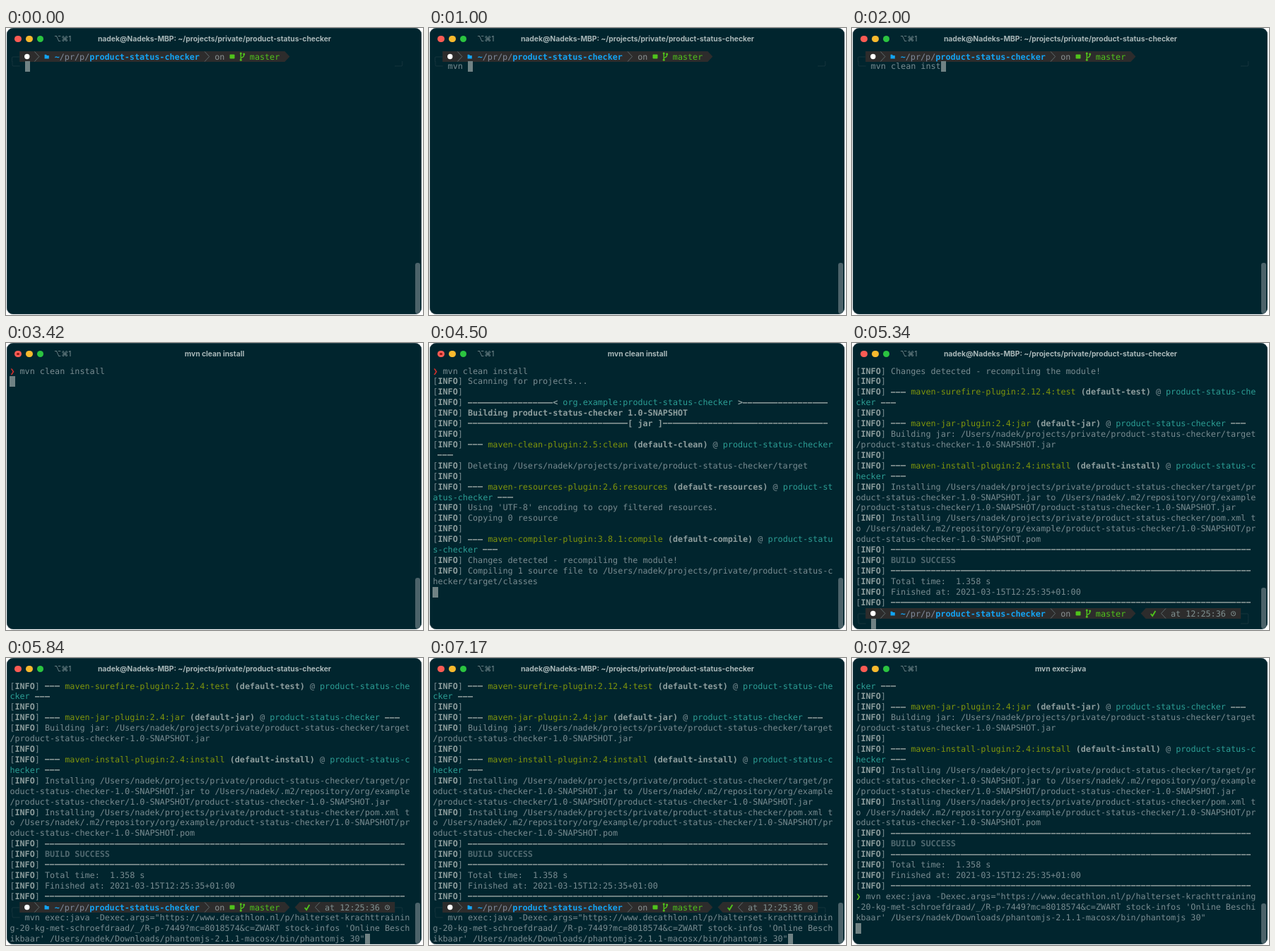
Animation, 590 px wide and 407 px high, one loop 8000 ms. Source, as an HTML page:

```html
<!DOCTYPE html>
<html lang="en">
<head>
<meta charset="utf-8">
<title>Terminal session</title>
<style>
  html, body { margin: 0; width: 100%; height: 100%; overflow: hidden; background: #fff; }
  #window {
    position: absolute; left: 1px; top: 0; width: 587px; height: 406px;
    border-radius: 9px; background: #01252e; overflow: hidden;
    box-shadow: inset 0 0 0 .6px #4a6067;
  }
  #stage { position: absolute; left: -1px; top: 0; width: 590px; height: 407px; }
  .light { position: absolute; top: 10.7px; width: 9.6px; height: 9.6px; border-radius: 50%; }
  #busy { position: absolute; left: 15.3px; top: 13.8px; width: 3.4px; height: 3.4px; border-radius: 50%; background: #8c1a14; }
  #title, #tab {
    position: absolute; top: 8px; white-space: pre;
    font: 700 10.3px/15px Inter, "DejaVu Sans", sans-serif;
  }
  #title { left: 0; width: 590px; text-align: center; color: #a9b7b8; }
  #tab { left: 68px; font-weight: 400; font-size: 10px; color: #7d9094; }
  #screen, #screen text {
    font: 11.76px/14.93px "DejaVu Sans Mono", monospace;
    text-rendering: geometricPrecision; font-variant-ligatures: none;
  }
  #screen { position: absolute; left: 5.4px; top: 32.5px; color: #788b90; }
  .row { position: relative; height: 14.93px; white-space: pre; }
  .row svg { position: absolute; left: 0; top: 0; overflow: visible; }
  .b { font-weight: 700; color: #8d9d9d; }
  .d { font-weight: 700; color: #506970; }
  .g { color: #7f950c; }
  .c { color: #2c9d94; }
  .r { color: #d9302c; }
  .k { color: #5fc41a; }
  .f { color: #17353d; }
  .h {
    color: transparent;
    background: repeating-linear-gradient(90deg, #819090 0 6.4px, #3a5056 6.4px 7.08px) 0 6.3px / 100% 1.7px no-repeat;
  }
  #cursor { position: absolute; width: 7.4px; height: 14.93px; background: #708284; }
  #thumb { position: absolute; left: 579px; width: 6.6px; border-radius: 3.3px; background: #4c636a; }
</style>
</head>
<body>
<div id="window"><div id="stage">
  <i class="light" style="left:12.2px;background:#fc5b54"></i>
  <i class="light" style="left:28.1px;background:#f9b92e"></i>
  <i class="light" style="left:43.8px;background:#2bc440"></i>
  <i id="busy"></i>
  <div id="tab">⌥⌘1</div>
  <div id="title"></div>
  <div id="screen"></div>
  <div id="cursor"></div>
  <div id="thumb"></div>
</div></div>
<script>
const LOOP = 8000, COLS = 80, ROWS = 25, CELL = 7.08, LINE = 14.93, LEFT = 5.4, TOP = 32.5;
const SCROLLBACK = 105, TRACK_TOP = 31, TRACK = 374;
const $ = id => document.getElementById(id);

// Markup: |x:text| gives text the class x.
const toCells = source => source.split("|").flatMap(part => {
  const styled = /^[bdgcrkfh]:/.test(part);
  return [...(styled ? part.slice(2) : part)].map(ch => ({ ch, cls: styled ? part[0] : "" }));
});

function wrap(source) {
  const cells = toCells(source), rows = [];
  do rows.push(cells.splice(0, COLS)); while (cells.length);
  return rows;
}

const project = "product-status-checker";
const home = "/Users/nadek";
const root = `${home}/projects/private/${project}`;
const repo = `${home}/.m2/repository/org/example/${project}/1.0-SNAPSHOT/${project}-1.0-SNAPSHOT`;
const shellTitle = `nadek@Nadeks-MBP: ~/projects/private/${project}`;
const build = "mvn clean install";
const exec = `mvn exec:java -Dexec.args="https://www.decathlon.nl/p/halterset-krachttraining-20-kg-met-schroefdraad/_/R-p-7449?mc=8018574&c=ZWART stock-infos 'Online Beschikbaar' ${home}/Downloads/phantomjs-2.1.1-macosx/bin/phantomjs 30"`;

const info = (text = "") => `[|b:INFO|] ${text}`;
const dashes = n => `|h:${"-".repeat(n)}|`;
const plugin = (goal, id) =>
  info(`${dashes(3)} |g:${goal}| |b:(${id})| @ |c:${project}| ${dashes(3)}`);
const encoding = info("Using 'UTF-8' encoding to copy filtered resources.");
const changes = info("Changes detected - recompiling the module!");
const rule = info(dashes(72));

const log = [
  [3500, info("Scanning for projects...")],
  [3660, info(), info(`${dashes(17)}|b:< ||c:org.example:${project}||b: >|${dashes(17)}`),
    info(`|b:Building ${project} 1.0-SNAPSHOT|`), info(`${dashes(32)}|b:[ jar ]|${dashes(33)}`)],
  [3910, info(), plugin("maven-clean-plugin:2.5:clean", "default-clean"), info(`Deleting ${root}/target`)],
  [4080, info(), plugin("maven-resources-plugin:2.6:resources", "default-resources")],
  [4160, encoding, info("Copying 0 resource")],
  [4250, info(), plugin("maven-compiler-plugin:3.8.1:compile", "default-compile")],
  [4330, changes, info(`Compiling 1 source file to ${root}/target/classes`)],
  [4660, info(), plugin("maven-resources-plugin:2.6:testResources", "default-testResources"), encoding,
    info(`skip non existing resourceDirectory ${root}/src/test/resources`),
    info(), plugin("maven-compiler-plugin:3.8.1:testCompile", "default-testCompile"), changes,
    info(), plugin("maven-surefire-plugin:2.12.4:test", "default-test")],
  [4740, info(), plugin("maven-jar-plugin:2.4:jar", "default-jar"),
    info(`Building jar: ${root}/target/${project}-1.0-SNAPSHOT.jar`)],
  [4820, info(), plugin("maven-install-plugin:2.4:install", "default-install"),
    info(`Installing ${root}/target/${project}-1.0-SNAPSHOT.jar to ${repo}.jar`),
    info(`Installing ${root}/pom.xml to ${repo}.pom`),
    rule, info("|d:BUILD SUCCESS|"), rule,
    info("Total time:  1.358 s"), info("Finished at: 2021-03-15T12:25:35+01:00"), rule],
];

// Prompt header, drawn on the character grid.
const x = col => col * CELL;
const label = (col, text, fill, bold) =>
  `<text x="${x(col)}" y="11.53" fill="${fill}"${bold ? ' style="font-weight:700"' : ""}>${text}</text>`;
const stroke = (d, color, width = 1) =>
  `<path d="${d}" fill="none" stroke="${color}" stroke-width="${width}"/>`;
const green = "#4fc31c", blue = "#12a4f4", bar = "#2d2c2c", thin = "#5f6c6f";

function header(clock) {
  const left = `<path d="M${x(2)} 0H${x(55)}l7 7.5l-7 7.4H${x(2)}z" fill="${bar}"/>
    <circle cx="${x(3.5)}" cy="7.5" r="3.7" fill="#fff"/>
    ${stroke(`M${x(5)} .5l6.5 7l-6.5 7M${x(39)} .5l6.5 7l-6.5 7`, thin)}
    <path d="M${x(7)} 4.8h2.4l1 1.2h2.8v4.4h-6.2z" fill="${blue}"/>
    ${label(9, "~", blue, true)}${label(10, "/pr/p/", "#7f8b9c")}${label(16, project, blue, true)}
    ${label(41, "on", "#8a9293")}
    <rect x="${x(44)}" y="4.4" width="7" height="6.2" rx="1" fill="${green}"/>
    ${stroke(`M${x(46) + 1.6} 3v9.5M${x(46) + 6} 4v1.5q0 2.5 -4.4 4`, green, 1.4)}
    <g fill="${green}"><circle cx="${x(46) + 1.6}" cy="3" r="1.5"/><circle cx="${x(46) + 6}" cy="4" r="1.5"/><circle cx="${x(46) + 1.6}" cy="12.3" r="1.5"/></g>
    ${label(48, "master", green)}${label(0, "╭─", "#17353d")}`;
  const right = clock ? `<path d="M${x(77)} 0H${x(58)}l-7 7.5l7 7.4H${x(77)}z" fill="${bar}"/>
    ${stroke(`M${x(59)} 8l2.4 3l4.2 -7`, green, 1.9)}
    ${stroke(`M${x(62)} .5l-6.5 7l6.5 7`, thin)}
    ${label(63, `at ${clock}`, "#7f9090")}
    <circle cx="${x(75.5)}" cy="7.8" r="3.1" fill="none" stroke="#7f9090"/>
    ${stroke(`M${x(75.5)} 6v2h1.6`, "#7f9090", .8)}${label(77, "─╮", "#17353d")}` : "";
  return `<svg width="580" height="14.93">${left}${right}</svg>`;
}

// Every visible state of the session, in order of time; the view never scrolls back.
const states = [];
let scroll = 0;
function add(at, title, rows, extra = {}) {
  scroll = Math.max(scroll, rows.length - ROWS);
  states.push({ at, title, rows, scroll, ...extra });
}

function prompt(command, clock) {
  const rows = wrap(`|f:╰─| ${command}`);
  const col = rows.at(-1).length;
  if (rows.length === 1) rows[0] = toCells(`|f:╰─| ${command.padEnd(74)}|f:─╯|`);
  return { rows: [header(clock), ...rows], col };
}
function addPrompt(at, before, command, clock) {
  const { rows, col } = prompt(command, clock);
  add(at, shellTitle, [...before, ...rows], { col });
}
// Enter moves to a new line first, then the prompt shrinks to one arrow.
function addEnter(at, title, before, command, clock, arrow) {
  add(at, title, [...before, ...prompt(command, clock).rows, []]);
  const after = [...before, ...wrap(`${arrow} ${command}`)];
  add(at, title, [...after, []]);
  return after;
}

addPrompt(0, [], "");
for (let i = 0; i < build.length; i++) addPrompt(700 + i * 97, [], build.slice(0, i + 1));

let output = addEnter(2670, build, [], build, "", "|r:❯|");
add(3000, build, [...output, []], { busy: true });
for (const [at, ...lines] of log) {
  output = [...output, ...lines.flatMap(wrap)];
  add(at, build, [...output, []], { busy: true });
}
addPrompt(5000, output, "", "12:25:36");
addPrompt(5500, output, exec, "12:25:36");
addEnter(7700, "mvn exec:java", output, exec, "12:25:36", "|k:❯|");

function rowElement(row) {
  const el = document.createElement("div");
  el.className = "row";
  if (typeof row === "string") {
    el.innerHTML = row;
    return el;
  }
  let span;
  for (const { ch, cls } of row) {
    if (!span || span.className !== cls) {
      span = el.appendChild(document.createElement("span"));
      span.className = cls;
    }
    span.textContent += ch;
  }
  return el;
}

function show({ title, rows, scroll, col = 0, busy = false }) {
  const visible = rows.slice(scroll);
  const size = TRACK * ROWS / (SCROLLBACK + ROWS + scroll);
  $("title").textContent = title;
  $("busy").style.display = busy ? "block" : "none";
  $("screen").replaceChildren(...visible.map(rowElement));
  $("cursor").style.left = `${LEFT + col * CELL}px`;
  $("cursor").style.top = `${TOP + (visible.length - 1) * LINE}px`;
  $("thumb").style.top = `${TRACK_TOP + TRACK - size}px`;
  $("thumb").style.height = `${size}px`;
}

let current;
function tick() {
  const t = performance.now() % LOOP;
  const next = states.findLast(state => state.at <= t);
  if (next !== current) show(current = next);
  requestAnimationFrame(tick);
}
tick();
</script>
</body>
</html>
```
